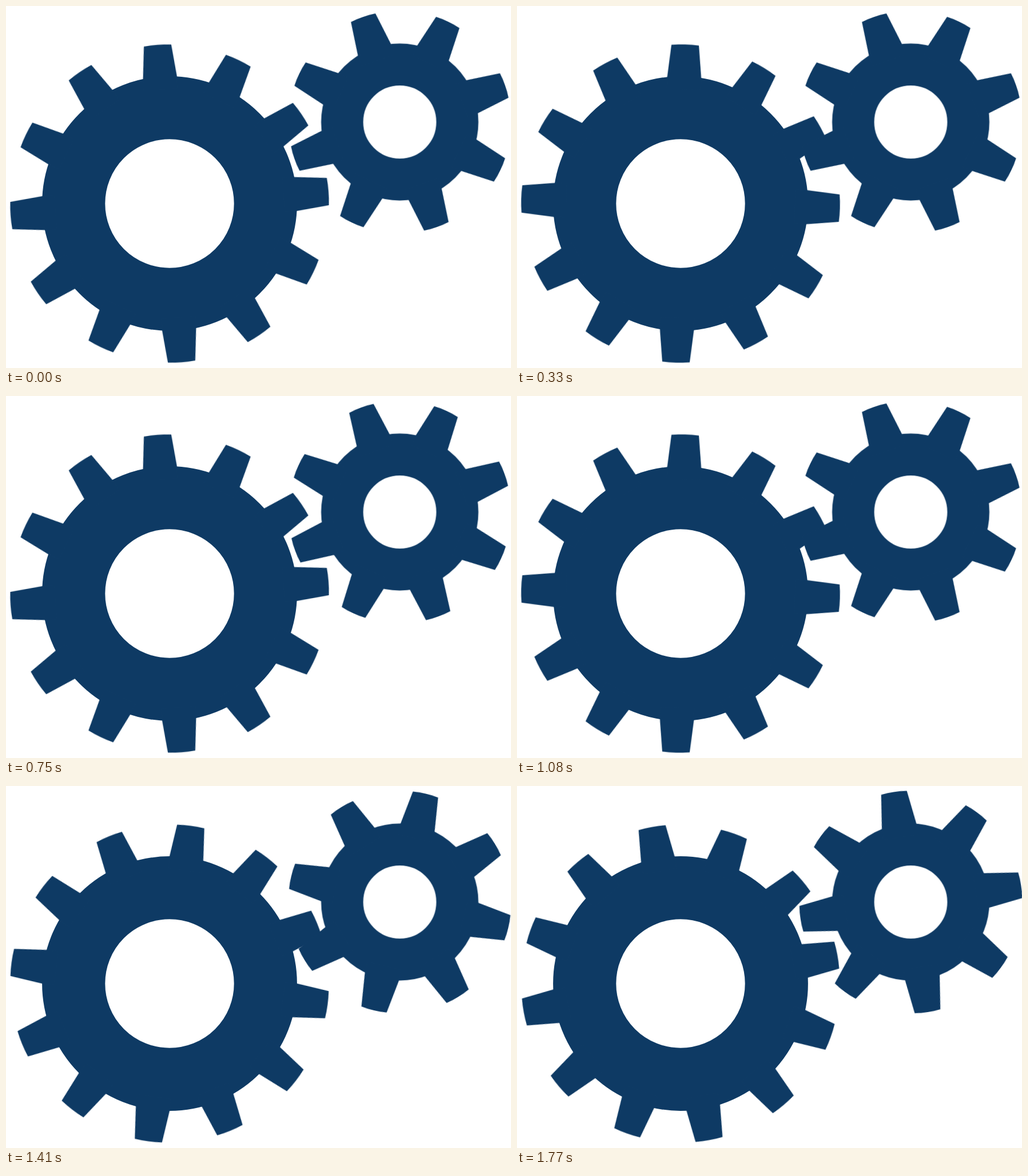
Recreate the animation shown at these times as an HTML page without scripts. Size 883 by 634 pixels, loop 1.8 s.

```html
<!DOCTYPE html>
<html lang="en">
<head>
<meta charset="utf-8">
<title>Gears</title>
<style>
  html, body { margin: 0; width: 100%; height: 100%; overflow: hidden; background: #fff; }
  svg { display: block; width: 883px; height: 634px; fill: #0e3a64; }
  .ring { fill: none; stroke: #0e3a64; }

  .turn { animation: turn 1.8s steps(60, end) -3ms infinite; }
  .tick { animation: tick .15s step-end -3ms infinite; }
  .slip { animation: slip 1.8s linear infinite; }

  @keyframes turn { to { transform: rotate(360deg); } }

  /* one tooth per cycle, with a short rest at the start */
  @keyframes tick {
    0%   { transform: rotate(0deg); }
    40%  { transform: rotate(-11.25deg); }
    60%  { transform: rotate(-22.5deg); }
    80%  { transform: rotate(-33.75deg); }
    100% { transform: rotate(-45deg); }
  }

  /* slight play between the gears */
  @keyframes slip {
    0%, 28.3% { transform: rotate(0deg); }
    41.7% { transform: rotate(-1deg); }
    60%   { transform: rotate(0deg); }
    78.3% { transform: rotate(-1deg); }
    98.3% { transform: rotate(-.7deg); }
    100%  { transform: rotate(0deg); }
  }
</style>
</head>
<body>
<svg viewBox="0 0 883 634" aria-hidden="true">
  <defs>
    <path id="bigTooth" d="M-29.8-200V-220.8L-24-277.6A278.6 278.6 0 0 1 24-277.6L29.8-220.8V-200z"/>
    <g id="bigFour">
      <use href="#bigTooth"/>
      <use href="#bigTooth" transform="rotate(90)"/>
      <use href="#bigTooth" transform="rotate(180)"/>
      <use href="#bigTooth" transform="rotate(270)"/>
    </g>
    <path id="smallTooth" d="M-30.6-115V-134.1L-22.7-193.6A194.9 194.9 0 0 1 22.7-193.6L30.6-134.1V-115z"/>
    <g id="smallFour">
      <use href="#smallTooth"/>
      <use href="#smallTooth" transform="rotate(90)"/>
      <use href="#smallTooth" transform="rotate(180)"/>
      <use href="#smallTooth" transform="rotate(270)"/>
    </g>
  </defs>

  <g transform="translate(286 346)">
    <circle class="ring" r="167.8" stroke-width="110.2"/>
    <g class="turn">
      <g transform="rotate(-4.34)">
        <use href="#bigFour"/>
        <use href="#bigFour" transform="rotate(30)"/>
        <use href="#bigFour" transform="rotate(60)"/>
      </g>
    </g>
  </g>

  <g transform="translate(688.5 203.2)">
    <circle class="ring" r="100.7" stroke-width="73.6"/>
    <g class="slip">
      <g class="tick">
        <g transform="rotate(-19.3)">
          <use href="#smallFour"/>
          <use href="#smallFour" transform="rotate(45)"/>
        </g>
      </g>
    </g>
  </g>
</svg>
</body>
</html>
```
